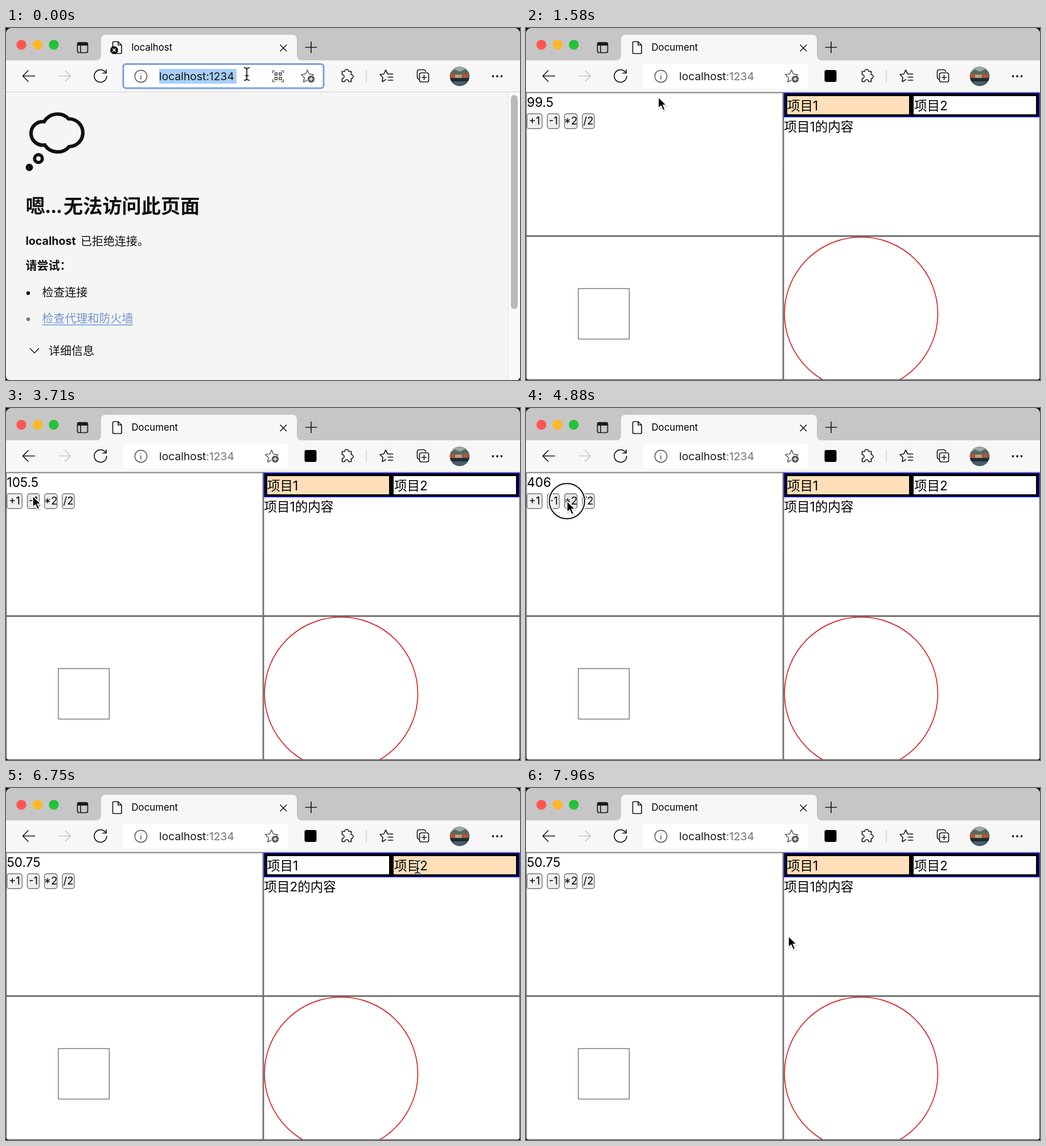
An HTML page that plays this animation: 903 by 620 pixels, repeating every 8000 ms.

```html
<!DOCTYPE html>
<html lang="zh">
<head>
<meta charset="utf-8">
<title>Document</title>
<style>
  html, body { margin: 0; width: 100%; height: 100%; overflow: hidden; background: #000; }
  svg { display: block; width: 903px; height: 620px; border-radius: 9px 9px 6px 6px; }
  text { font-family: Inter, "Noto Sans CJK SC", "Noto Sans CJK", sans-serif; white-space: pre; }
  .icon { fill: none; stroke: #1b1b1b; stroke-width: 1.7; stroke-linecap: round; stroke-linejoin: round; }
  .muted { stroke: #666; }
  .url { font-size: 19.3px; fill: #161616; }
  .error { font-size: 20px; fill: #111; }
  .page { font-size: 22.5px; fill: #000; }
  .border { fill: none; stroke: #737373; stroke-width: 1.4; }
  .button text { font-size: 18.6px; text-anchor: middle; }
</style>
</head>
<body>
<svg viewBox="0 0 903 620">
  <defs>
    <clipPath id="round"><circle cx="797" cy="85" r="17.3"/></clipPath>
    <path id="star" d="M0-11 3.2-4 11-3 5.3 2.5 6.8 10.2 0 6.5-6.8 10.2-5.3 2.5-11-3-3.2-4Z"/>
    <g id="info">
      <circle class="icon muted" cx="237" cy="85" r="10.7" stroke-width="1.5"/>
      <path class="icon muted" d="M237 84v6M237 79.8v.2"/>
    </g>
    <g id="addFavorite">
      <path class="icon muted" d="M7-3.3 3.2-4 0-11-3.2-4-11-3-5.3 2.5-6.8 10.2-1 7.2M7-3.3 11-3 9.5-1.4"/>
      <circle cx="6.5" cy="5" r="6.2" fill="#5c5c5c"/>
      <path d="M3.3 5h6.4M6.5 1.8v6.4" stroke="#fff" stroke-width="1.5"/>
    </g>
    <path id="sheet" class="icon" fill="#f7f7f7" d="M197 24H190q-2.5 0-2.5 2.5V42.500q0 2.500 2.500 2.500H200.500q2.500 0 2.500-2.500V30ZV30H203"/>
  </defs>

  <!-- window frame -->
  <rect width="903" height="57" fill="#c6c6c6"/>
  <path d="M158 57q9 0 9-9V20q0-8 8-8H503q8 0 8 8V48q0 9 9 9Z" fill="#f7f7f7"/>
  <rect y="57" width="903" height="56" fill="#f7f7f7"/>
  <circle cx="27" cy="29.500" r="8.700" fill="#fe5650"/>
  <circle cx="55.500" cy="29.500" r="8.700" fill="#fdb827"/>
  <circle cx="84" cy="29.500" r="8.700" fill="#25c33a"/>
  <rect class="icon" x="125.500" y="25.500" width="18" height="18" rx="3"/>
  <path d="M125 31v-3q0-3 3-3h13q3 0 3 3v3Z" fill="#1b1b1b"/>
  <path class="icon" d="M131 30v13"/>
  <path class="icon" d="M482 30 492.500 40.500M492.500 30 482 40.500M526.500 34h19M536 24.500v19"/>

  <!-- toolbar -->
  <path class="icon" d="M50.500 84.500H29.500M39 75 29.500 84.500 39 94"/>
  <path class="icon" style="stroke:#c5c5c5" d="M92.500 84.500H113.500M104 75 113.500 84.500 104 94"/>
  <path class="icon" d="M175.500 79A11 11 0 1 0 177 85M176 73.500V79.500H170"/>
  <path class="icon" d="M590.500 76.500H595a3.500 3.500 0 0 1 7 0H606.500V82a3.500 3.500 0 0 1 0 7V94.500H602a3.500 3.500 0 0 0-7 0H590.500V89a3.500 3.500 0 0 0 0-7Z"/>
  <path d="M633 73V96" stroke="#d0d0d0" stroke-width="1.500"/>
  <path class="icon" d="M673 81H670.500L667 74 663.800 81 657 82 662 87 661 94.500 667 91M674 81h5.500M671.500 86.500h8M671.500 92h8"/>
  <path class="icon" d="M726 90.500q-3.500-1-3.500-4V77.500q0-4 4-4H733.500q3 0 4 3"/>
  <rect class="icon" x="726.500" y="79" width="16" height="16" rx="3"/>
  <path class="icon" d="M734.500 83v8M730.500 87h8"/>
  <g clip-path="url(#round)">
    <path fill="#9ca8a5" d="M779 67h36v36h-36z"/>
    <path fill="#526a5d" d="M779 80 788 73 798 77 807 72 815 79V90H779Z"/>
    <path fill="#b85139" d="M779 81h9v8h-9zM803 80h8v8h-8z"/>
    <path fill="#c59a72" d="M789 82h12v6h-12z"/>
    <path fill="#202d34" d="M779 88h36v6h-36z"/>
    <path fill="#465f69" d="M779 94h36v9h-36z"/>
  </g>
  <g fill="#1b1b1b"><circle cx="855.500" cy="85" r="1.900"/><circle cx="863" cy="85" r="1.900"/><circle cx="870.500" cy="85" r="1.900"/></g>

  <g id="errorView">
    <use href="#sheet"/>
    <circle cx="190" cy="39" r="7" fill="#111"/>
    <path d="M187.500 36.500l5 5m0-5l-5 5" stroke="#fff" stroke-width="1.600"/>
    <text x="220.500" y="40" font-size="16.800">localhost</text>
    <rect x="206" y="63.500" width="352" height="42.500" rx="5" fill="#fff" stroke="#779fe2" stroke-width="3"/>
    <use href="#info"/>
    <rect x="269" y="72" width="136" height="26" fill="#a8cffa"/>
    <text class="url" x="269" y="91.500">localhost:1234</text>
    <path class="icon muted" d="M468.500 79V75.500H472M484 75.500h3.500V79M487.500 91v3.500H484M472 94.500h-3.500V91"/>
    <path fill="none" stroke="#666" stroke-width="1.800" d="M472.500 79h4v4h-4zM480 79h4v4h-4zM472.500 87h4v4h-4zM480 87h4v4h-4z"/>
    <use href="#addFavorite" x="529.500" y="85"/>
    <rect y="112" width="903" height="508" fill="#f5f5f5"/>
    <path d="M0 112.500H903" stroke="#cecece"/>
    <path d="M882 113h21v507h-21z" fill="#fafafa"/>
    <path d="M882.500 113v507" stroke="#e5e5e5"/>
    <rect x="887" y="118" width="12" height="377" rx="6" fill="#b9b9b9"/>
    <path d="M67 165A27 27 0 0 1 110 160A24.500 24.500 0 0 1 111 209A27 27 0 0 1 68 206A20.700 20.700 0 1 1 67 165Z" fill="none" stroke="#111" stroke-width="6.200"/>
    <circle cx="57" cy="230" r="6.800" fill="none" stroke="#111" stroke-width="5.800"/>
    <circle cx="41" cy="245.500" r="6.500" fill="#111"/>
    <g class="error">
      <g style="font-size:34.200px;font-weight:700">
        <text x="34.500" y="325.500">嗯</text><text x="68" y="325.500" letter-spacing="-1.500">...</text>
        <text x="101" y="325.500">无法访问此页面</text>
      </g>
      <text x="34.500" y="382" font-size="19.600" font-weight="700">localhost</text>
      <text x="131" y="382.500">已拒绝连接。</text>
      <text x="34.500" y="425.500" font-weight="700">请尝试：</text>
      <circle cx="39" cy="467" r="3.200"/>
      <text x="63.500" y="473">检查连接</text>
      <circle cx="39" cy="513" r="3.200" fill="#777"/>
      <text x="63.500" y="518.500" fill="#6d94d0">检查代理和防火墙</text>
      <path d="M63.500 523H223" stroke="#6d94d0" stroke-width="1.400"/>
      <path class="icon" style="stroke-width:1.500" d="M42.500 564.500 50 572.500 57.500 564.500"/>
      <text x="75" y="575.500">详细信息</text>
    </g>
  </g>

  <g id="documentView">
    <use href="#sheet"/>
    <text x="220.500" y="40" font-size="16.800">Document</text>
    <rect x="206" y="63" width="289.500" height="43.500" rx="5" fill="#fff"/>
    <use href="#info"/>
    <text class="url" x="269" y="91.500">localhost<tspan fill="#737373">:1234</tspan></text>
    <use href="#addFavorite" x="466.500" y="85"/>
    <rect x="524.500" y="74" width="21" height="21" rx="3"/>
    <rect y="112" width="903" height="508" fill="#fff"/>
    <path d="M0 112.500H903" stroke="#cecece"/>
    <rect class="border" x="91.900" y="458.900" width="89.500" height="89"/>
    <circle cx="588.800" cy="503" r="134.700" fill="none" stroke="#d40a0a" stroke-width="1.500"/>
    <path class="border" d="M.7 114H902.300V619.300H.7Z"/>
    <path class="border" style="stroke-width:2.800" d="M452 113V620M0 366.500H903"/>
    <text class="page" id="counter" x="1.500" y="139"></text>
    <g id="buttons"></g>
    <rect x="453.700" y="114.900" width="447.800" height="41.600" stroke="#1010e8" stroke-width="1.500"/>
    <rect id="tab1" x="459" y="120" width="214" height="32"/>
    <rect id="tab2" x="681" y="120" width="215" height="32"/>
    <text class="page" x="459" y="144.700">项目1</text>
    <text class="page" x="682" y="144.700">项目2</text>
    <text class="page" id="content" x="453.500" y="182"></text>
  </g>

  <g id="ring" fill="none">
    <circle r="31" stroke="#fff" stroke-width="6" stroke-opacity=".85"/>
    <circle r="31" stroke="#111" stroke-width="2"/>
  </g>
  <g id="arrow">
    <path d="M1 2V21L5.500 17 9 25 12.500 23.500 9 16H15Z" fill="#000" stroke="#000" stroke-width="2.500" opacity=".13"/>
    <path d="M0 0V19.500L4.700 15.400 8.300 23.400 11.800 21.900 8.300 14H14.300Z" stroke="#fff" stroke-width="1.500"/>
  </g>
  <g id="beam" fill="none" stroke-linecap="round">
    <path d="M-4.500-11Q0-11 0-8Q0-11 4.500-11M0-8V8M-4.500 11Q0 11 0 8Q0 11 4.500 11M-2.500 3H2.500" stroke="#fff" stroke-width="3.500"/>
    <path d="M-4.500-11Q0-11 0-8Q0-11 4.500-11M0-8V8M-4.500 11Q0 11 0 8Q0 11 4.500 11M-2.500 3H2.500" stroke="#000" stroke-width="1.600"/>
  </g>
</svg>
<script>
const LOOP = 8000, LOADED = 460, PRESS = 95;
const $ = id => document.getElementById(id);

const buttons = [["+1", 1.7, 26.5], ["-1", 37.5, 21], ["*2", 67.7, 22], ["/2", 99, 21]];
$("buttons").innerHTML = buttons.map(([label, x, width]) => `<g class="button">
  <rect x="${x}" y="151" width="${width}" height="26.300" rx="4" stroke="#737373" stroke-width="1.400"/>
  <text x="${x + width / 2}" y="170.300">${label}</text></g>`).join("");
const buttonFaces = document.querySelectorAll(".button rect");

// Cursor stops: time, x, y
const path = [
  [0, 423, 81], [1050, 423, 81], [2150, 21, 167], [3420, 21, 167],
  [3640, 47, 155], [4260, 47, 155], [4430, 72, 164], [4980, 72, 164],
  [5280, 108, 164], [6020, 108, 164], [6560, 723, 139], [6860, 723, 139],
  [7380, 490, 138], [7580, 490, 138], [7920, 461, 261], [LOOP, 461, 261]
];

// Each click takes effect on release
const repeat = (start, step, count, action) =>
  Array.from({ length: count }, (_, i) => ({ time: start + i * step, action }));
const clicks = [
  ...repeat(2520, 176, 6, s => s.value++),
  ...repeat(3850, 130, 4, s => s.value--),
  ...repeat(4560, 190, 3, s => s.value *= 2),
  ...repeat(5420, 175, 4, s => s.value /= 2),
  ...repeat(6710, 0, 1, s => s.tab = 2),
  ...repeat(7560, 0, 1, s => s.tab = 1)
];

function cursorAt(t) {
  const i = path.findIndex(stop => stop[0] > t);
  const [t0, x0, y0] = path[i - 1], [t1, x1, y1] = path[i];
  const p = (t - t0) / (t1 - t0), ease = p * p * (3 - 2 * p);
  return [x0 + (x1 - x0) * ease, y0 + (y1 - y0) * ease];
}

const show = (id, visible) => $(id).style.display = visible ? "" : "none";
const within = (x, y, left, top, right, bottom) => x >= left && x <= right && y >= top && y <= bottom;

function draw() {
  const t = performance.now() % LOOP;
  const state = { value: 99.5, tab: 1 };
  for (const click of clicks) if (t >= click.time) click.action(state);

  show("errorView", t < LOADED);
  show("documentView", t >= LOADED);
  $("counter").textContent = state.value;
  $("content").textContent = `项目${state.tab}的内容`;
  for (const n of [1, 2]) $("tab" + n).setAttribute("fill", state.tab === n ? "#ffdfb9" : "#fff");

  const [x, y] = cursorAt(t);
  buttons.forEach(([, left, width], i) => buttonFaces[i].setAttribute("fill",
    within(x, y, left, 151, left + width, 177) ? "#e5e5e5" : "#efefef"));

  const overText = within(x, y, 262, 63, 450, 106) || within(x, y, 459, 122, 513, 151)
    || within(x, y, 682, 122, 741, 151) || within(x, y, 453, 162, 577, 187);
  show("beam", overText);
  show("arrow", !overText);
  show("ring", clicks.some(c => t >= c.time - PRESS && t < c.time));
  for (const id of ["beam", "arrow", "ring"]) $(id).setAttribute("transform", `translate(${x} ${y})`);
  requestAnimationFrame(draw);
}
draw();
</script>
</body>
</html>
```
